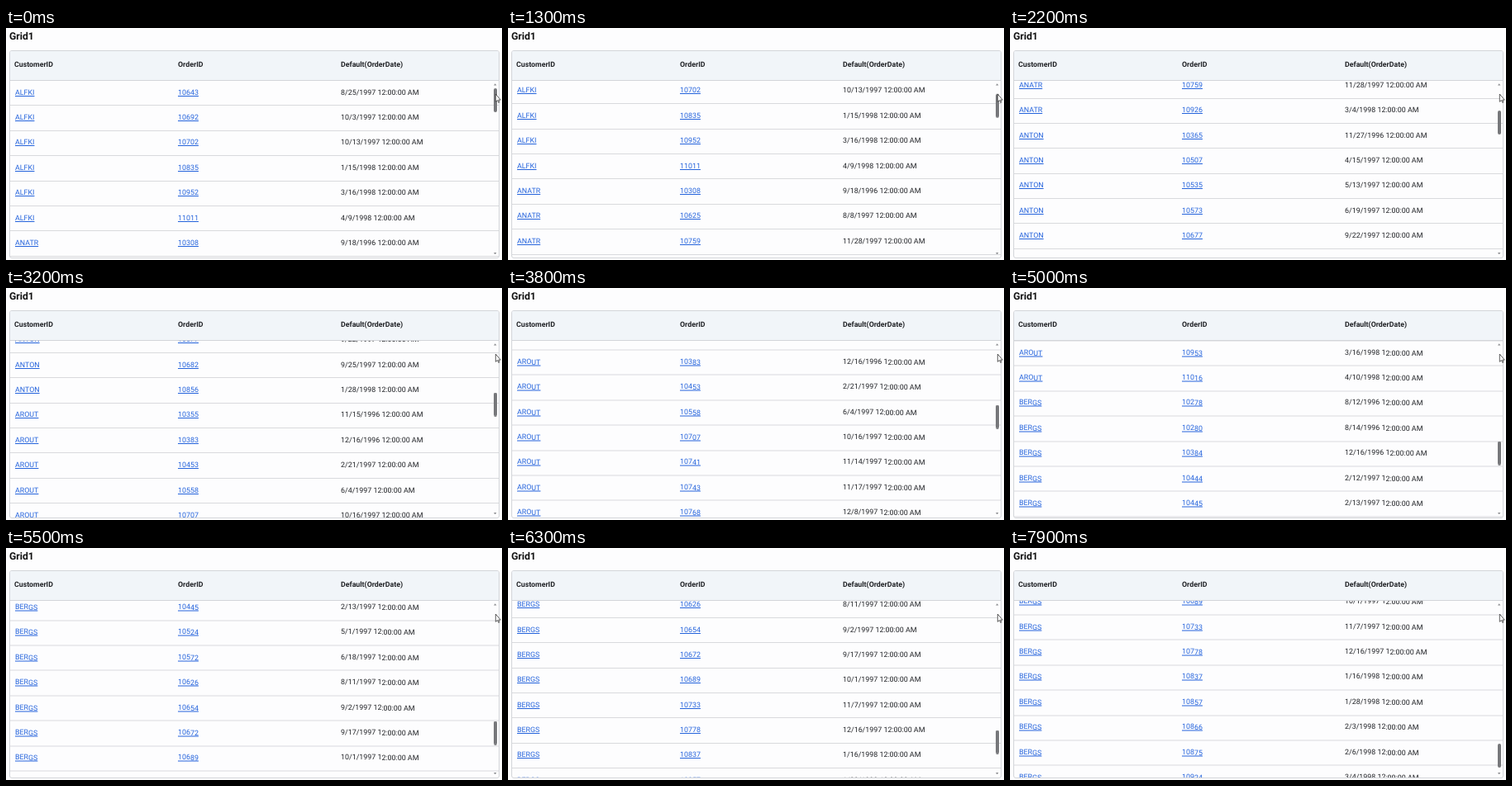
An HTML page that plays this animation: 600x281 px, repeating every 8000 ms.

```html
<!DOCTYPE html>
<html lang="en">
<head>
<meta charset="utf-8">
<title>Grid1</title>
<style>
  html, body { margin: 0; width: 100%; height: 100%; overflow: hidden; }
  body {
    position: relative;
    background: #fdfdfe;
    color: #202226;
    font: 8.9px Roboto, Arial, sans-serif;
    text-rendering: geometricPrecision;
  }
  /* An invisible tilt turns off glyph hinting, so text keeps its fractional size and place. */
  h1, .head span, .row > * { rotate: .005deg; }
  h1 { position: absolute; left: 4px; top: 2.4px; margin: 0; font: 700 12.2px/16px Roboto, Arial, sans-serif; color: #111; }
  .grid {
    position: absolute; left: 4px; top: 27px; width: 593px; height: 251.5px;
    box-sizing: border-box; border: 1px solid #d3d5d9; border-radius: 3px; overflow: hidden;
  }
  .head { height: 35px; background: #f1f5f9; border-bottom: 1px solid #d3d5d9; font-weight: 700; font-size: 8.8px; }
  .head, .row { position: relative; }
  .head span, .row > * { position: absolute; left: 5.5px; top: .7px; white-space: nowrap; line-height: 29.4px; }
  .head span { left: 5px; top: .3px; line-height: 35px; }
  .head :nth-child(2), .row :nth-child(2) { left: 202.5px; }
  .head :nth-child(3), .row :nth-child(3) { left: 399.5px; }
  .view { position: absolute; left: 0; right: 0; top: 36px; bottom: 0; overflow: hidden; }
  .rows { animation: scroll 8s infinite; }
  .row { height: 30.4px; box-sizing: border-box; border-bottom: 1px solid #d9dadd; }
  .row u { color: #2463dc; }
  .thumb {
    position: absolute; left: 590.4px; top: 0; width: 3.2px; height: 29px;
    border-radius: 2px; background: #77787b; animation: thumb 8s infinite;
  }
  svg { position: absolute; left: 0; top: 0; }

  @keyframes scroll {
    0% { transform: translateY(0); }
    12.5% { transform: translateY(0); animation-timing-function: steps(8); }
    27.5% { transform: translateY(-252px); animation-timing-function: steps(6); }
    40% { transform: translateY(-441px); animation-timing-function: steps(7); }
    55% { transform: translateY(-661.5px); animation-timing-function: steps(12); }
    68.75% { transform: translateY(-1039.5px); animation-timing-function: steps(3); }
    78.75% { transform: translateY(-1134px); animation-timing-function: steps(3); }
    87.5%, 100% { transform: translateY(-1228.5px); }
  }
  @keyframes thumb {
    0% { transform: translateY(73px); }
    12.5% { transform: translateY(73px); animation-timing-function: steps(8); }
    27.5% { transform: translateY(100px); animation-timing-function: steps(6); }
    40% { transform: translateY(126.5px); animation-timing-function: steps(7); }
    55% { transform: translateY(161.5px); animation-timing-function: steps(12); }
    68.75% { transform: translateY(209.5px); animation-timing-function: steps(3); }
    78.75% { transform: translateY(220.5px); animation-timing-function: steps(3); }
    87.5%, 100% { transform: translateY(237px); }
  }
</style>
</head>
<body>
<h1>Grid1</h1>
<div class="grid">
  <div class="head"><span>CustomerID</span><span>OrderID</span><span>Default(OrderDate)</span></div>
  <div class="view"><div class="rows"></div></div>
</div>
<div class="thumb"></div>
<svg width="600" height="281">
  <path d="M590 69.5l1.7-2.2 1.7 2.2zM590 272l1.7 2.2 1.7-2.2z" fill="#8b8c8f"/>
  <path d="M592.3 80v9.3l2.1-1.8 1.4 2.9 1.2-.6-1.3-2.7h2.6z" fill="#fff" stroke="#333" stroke-width=".8"/>
</svg>
<script>
  const orders = {
    ALFKI: '10643 8/25/1997, 10692 10/3/1997, 10702 10/13/1997, 10835 1/15/1998, 10952 3/16/1998, 11011 4/9/1998',
    ANATR: '10308 9/18/1996, 10625 8/8/1997, 10759 11/28/1997, 10926 3/4/1998',
    ANTON: '10365 11/27/1996, 10507 4/15/1997, 10535 5/13/1997, 10573 6/19/1997, 10677 9/22/1997, 10682 9/25/1997, 10856 1/28/1998',
    AROUT: '10355 11/15/1996, 10383 12/16/1996, 10453 2/21/1997, 10558 6/4/1997, 10707 10/16/1997, 10741 11/14/1997, ' +
      '10743 11/17/1997, 10768 12/8/1997, 10793 12/24/1997, 10864 2/2/1998, 10920 3/3/1998, 10953 3/16/1998, 11016 4/10/1998',
    BERGS: '10278 8/12/1996, 10280 8/14/1996, 10384 12/16/1996, 10444 2/12/1997, 10445 2/13/1997, 10524 5/1/1997, ' +
      '10572 6/18/1997, 10626 8/11/1997, 10654 9/2/1997, 10672 9/17/1997, 10689 10/1/1997, 10733 11/7/1997, ' +
      '10778 12/16/1997, 10837 1/16/1998, 10857 1/28/1998, 10866 2/3/1998, 10875 2/6/1998, 10924 3/4/1998'
  };
  const row = (customer, order) => {
    const [id, date] = order.split(' ');
    return `<div class="row"><u>${customer}</u><u>${id}</u><span>${date} 12:00:00 AM</span></div>`;
  };
  document.querySelector('.rows').innerHTML = Object.entries(orders)
    .flatMap(([customer, list]) => list.split(', ').map(order => row(customer, order)))
    .join('');
</script>
</body>
</html>
```
